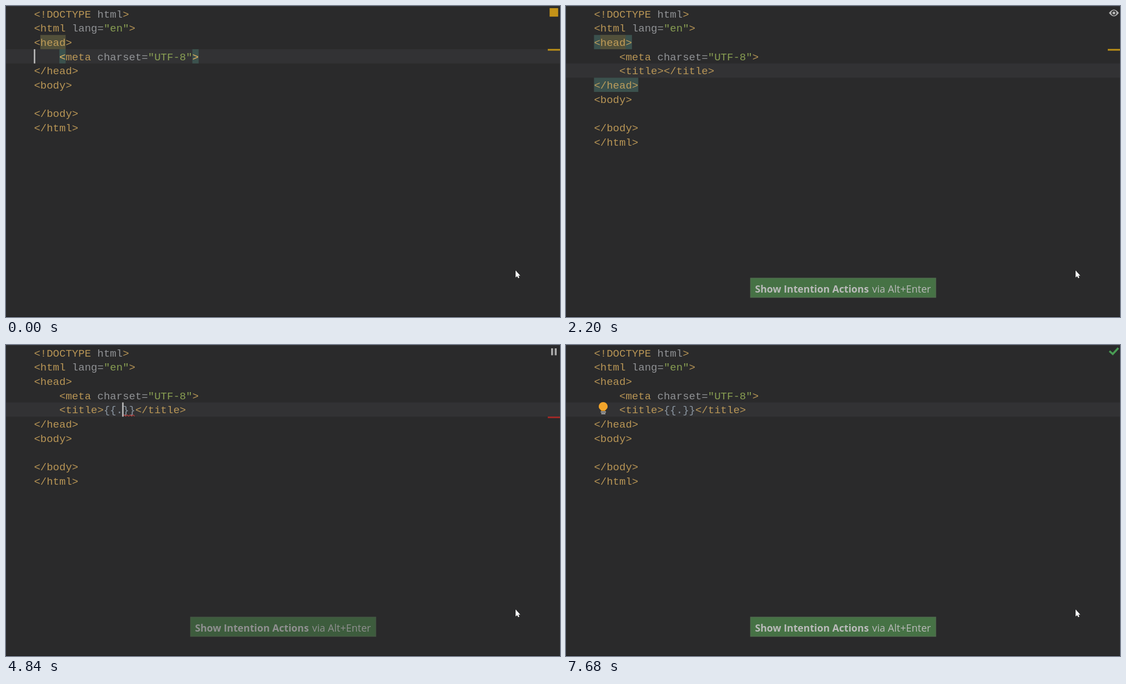
Animation of 998x561 px, one loop 8 s. Source, as an HTML page:

```html
<!DOCTYPE html>
<html lang="en">
<head>
<meta charset="UTF-8">
<title>Editor intentions</title>
<style>
  html, body { margin: 0; width: 100%; height: 100%; overflow: hidden; background: #2a2a2b; }
  svg { display: block; width: 100%; height: 100%; }
  text { white-space: pre; }
  .code { font: 19.02px "Liberation Mono", monospace; fill-opacity: 0.8; }
  .ui { font-family: "Open Sans", sans-serif; fill: #bbb; }
  .tag { fill: #dcb060; }
  .attr { fill: #aaadb0; }
  .str { fill: #a0bb5c; }
  .expr { fill: #a3b0be; }
</style>
</head>
<body>
<svg id="stage" viewBox="0 0 998 561" preserveAspectRatio="none"></svg>
<script>
const LOOP = 8000;
const LEFT = 50.4, CHAR = 11.41, TOP = 0.9, LINE = 25.68;
const TEAL = '#3b514d', OLIVE = '#52503a';
const stage = document.getElementById('stage');

const colX = col => LEFT + col * CHAR;
const rowY = row => TOP + row * LINE;
const rect = (x, y, w, h, fill, extra = '') =>
  `<rect x="${x}" y="${y}" width="${w}" height="${h}" fill="${fill}" ${extra}/>`;
const path = (d, style) => `<path d="${d}" ${style}/>`;
const escapeText = s => s.replace(/&/g, '&amp;').replace(/</g, '&lt;').replace(/>/g, '&gt;');
const box = (row, col, length, fill) =>
  rect(colX(col), rowY(row), length * CHAR, LINE, fill);
const code = (row, col, content, cls, extra = '') =>
  `<text class="code ${cls}" x="${colX(col)}" y="${rowY(row) + 19.7}" ${extra}>${escapeText(content)}</text>`;

// Each step changes only the listed properties.
const steps = [
  [0, { row: 3, caret: 0, icon: 'square', warn: true, olive: true, meta: true, head: false,
        title: null, pair: false, bulb: null, toast: 0, menu: null, error: false }],
  [80, { caret: null }],
  [480, { caret: 0 }],
  [880, { row: 2, caret: 1, meta: false }],
  [1080, { caret: 2 }],
  [1320, { head: true }],
  [1520, { bulb: 29, toast: 0.6 }],
  [1600, { toast: 1, caret: null, menu: { x: 71, y: 77, w: 272, label: 'Insert required tag title' } }],
  [2200, { row: 4, title: '', icon: 'eye', bulb: null, menu: null }],
  [2640, { caret: 11, icon: 'check', warn: false, head: false, olive: false, pair: true }],
  [3000, { bulb: 103 }],
  [3080, { caret: null }],
  [3520, { caret: 11 }],
  [3600, { title: '{', caret: 12, bulb: null, icon: 'eye' }],
  [3800, { title: '{{}}', caret: 13 }],
  [4000, { pair: false }],
  [4040, { error: true, icon: 'pause' }],
  [4480, { title: '{{.}}', caret: 14, icon: 'eye' }],
  [4840, { toast: 0.7, icon: 'pause' }],
  [4880, { toast: 0.35 }],
  [4960, { toast: 0, error: false, icon: 'check' }],
  [5320, { bulb: 103 }],
  [5560, { caret: null }],
  [6000, { caret: 14 }],
  [6400, { caret: null }],
  [6800, { caret: 14 }],
  [6880, { toast: 0.6 }],
  [6960, { toast: 1, caret: null, menu: { x: 208, y: 128, w: 210, label: 'Specify dot type' } }],
  [7680, { menu: null }]
];

function codeLines(s) {
  const lines = ['<!DOCTYPE html>', '<html lang="en">', '<head>', '    <meta charset="UTF-8">',
                 '</head>', '<body>', '', '</body>', '</html>'];
  if (s.title !== null) lines.splice(4, 0, `    <title>${s.title}</title>`);
  return lines;
}

const tokens = /(?<str>"[^"]*")|(?<attr> html(?=>)| \w+=)|(?<expr>[{}.]+)|(?<tag><[!\/]?\w+|>)/g;
function drawLine(line, row) {
  return [...line.matchAll(tokens)].map(m => {
    const cls = Object.keys(m.groups).find(key => m.groups[key] !== undefined);
    return code(row, m.index, m[0], cls);
  }).join('');
}

const icons = {
  square: rect(979.3, 3.8, 15.4, 15.4, '#c39218'),
  eye: path('M978 12.5Q987 0.5 996 12.5Q987 24.5 978 12.5Z', 'fill="#b2b2b2"') +
       '<circle cx="987" cy="12.5" r="4.6" fill="#2a2a2b"/><circle cx="987" cy="12.5" r="2.6" fill="#b2b2b2"/>',
  check: path('M979 11L985 16.3L995 5.6', 'fill="none" stroke="#499c54" stroke-width="3.6"'),
  pause: rect(982, 6, 3.5, 12.5, '#acacac') + rect(988.5, 6, 3.5, 12.5, '#acacac')
};

const bulbShape =
  path('M4.5 16C4.5 13.5 0 13 0 8A8 8 0 0 1 16 8C16 13 11.5 13.5 11.5 16Z', 'fill="#f3a52b"') +
  rect(3.5, 17, 9.5, 1.7, '#c4c4c4') + rect(4.5, 20, 7.5, 1.7, '#c4c4c4');
const drawBulb = (x, y, scale = 1) =>
  `<g transform="translate(${x} ${y}) scale(${scale})">${bulbShape}</g>`;

function drawSquiggle(col) {
  const x = colX(col);
  let d = `M${x} 128.5`;
  for (let i = 1; i <= 8; i++) d += `L${x + i * 2.7} ${i % 2 ? 126 : 128.5}`;
  return path(d, 'fill="none" stroke="#bc3f3c" stroke-width="1.2"');
}

const drawMenu = ({ x, y, w, label }) =>
  rect(x + 0.5, y + 0.5, w - 1, 35, '#3c3f41', 'stroke="#616365"') +
  rect(x + 1, y + 4, w - 2, 28, '#4b6eaf') + drawBulb(x + 10, y + 9, 0.8) +
  `<text class="ui" x="${x + 34}" y="${y + 24}" font-size="17.5">${escapeText(label)}</text>` +
  path(`M${x + w - 17} ${y + 13}l7 5l-7 5z`, 'fill="#bbb"');

const drawToast = opacity => `<g opacity="${opacity}">` +
  rect(332.5, 491, 333.5, 34.5, '#467245', 'stroke="#4f6b4d" stroke-width="1.5"') +
  '<text class="ui" x="340.5" y="516.5" font-size="17.7" font-weight="700">Show Intention Actions</text>' +
  '<text class="ui" x="551.5" y="516.5" font-size="18.05">via Alt+Enter</text></g>';

const pointer = path('M918 477V489.8L920.8 487.3L922.8 491L924.8 490L923 486.6H926.5Z',
                     'fill="#fff" stroke="#1c1c1d" stroke-width="0.8" paint-order="stroke"');

function draw(s) {
  let out = rect(0, 0, 998, 561, '#2a2a2b') + rect(0, 0, 998, 1, '#343436') + rect(0, 560, 998, 1, '#1c1c1d');
  out += rect(0, rowY(s.row), 998, LINE, '#323234');

  if (s.head) out += box(2, 0, 6, TEAL) + box(s.title === null ? 4 : 5, 0, 7, TEAL);
  if (s.olive) out += box(2, 1, 4, OLIVE);
  if (s.meta) out += box(3, 4, 1, TEAL) + box(3, 25, 1, TEAL);
  if (s.pair) out += box(4, 4, 7, TEAL) + box(4, 11 + s.title.length, 8, TEAL);

  out += codeLines(s).map(drawLine).join('');
  if (s.meta) {
    out += code(3, 4, '<', 'tag', 'font-weight="700"') + code(3, 25, '>', 'tag', 'font-weight="700"');
  }
  if (s.error) out += drawSquiggle(9 + s.title.length) + rect(976, 129, 22, 3, '#9e2927');
  if (s.warn) out += rect(976, 77.5, 22, 3, '#be9117');
  if (s.bulb !== null) out += drawBulb(59, s.bulb);
  if (s.caret !== null) {
    out += rect(Math.max(50.1, colX(s.caret) - 0.9), rowY(s.row), 2.6, LINE, '#bbb');
  }
  out += icons[s.icon];
  if (s.menu) out += drawMenu(s.menu);
  if (s.toast) out += drawToast(s.toast);
  stage.innerHTML = out + pointer;
}

let shown = -1;
const start = performance.now();
function tick(now) {
  const time = Math.max(0, now - start) % LOOP;
  const passed = steps.filter(([at]) => at <= time);
  if (passed.length !== shown) {
    shown = passed.length;
    draw(Object.assign({}, ...passed.map(([, change]) => change)));
  }
  requestAnimationFrame(tick);
}
tick(start);
</script>
</body>
</html>
```
